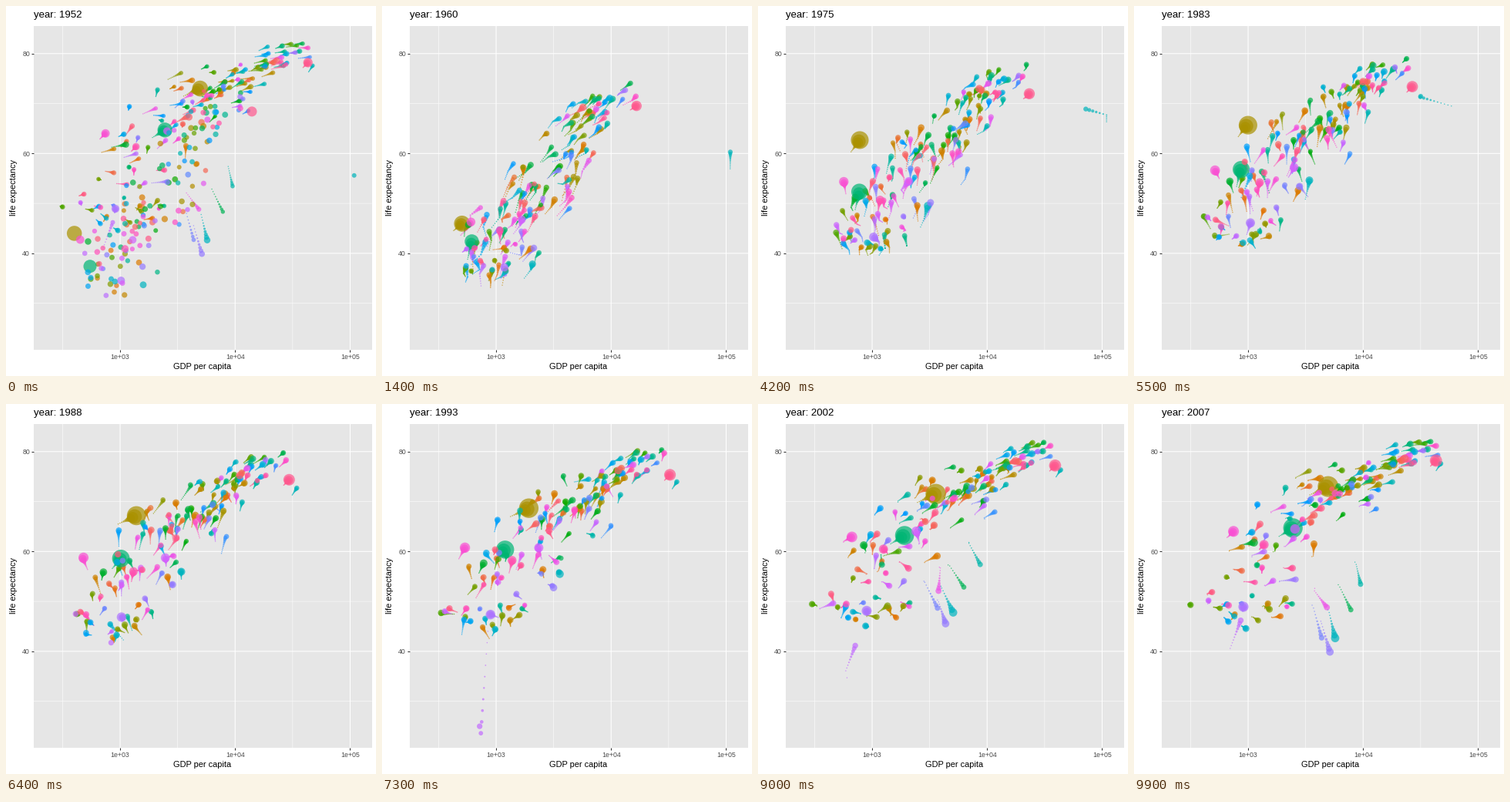
Write a matplotlib script that moves like this. It is 480 px wide and 480 px high and loops after 10 s.

```python
import numpy as np
import matplotlib.pyplot as plt
from matplotlib.animation import FuncAnimation

SIZE, DPI = 480, 80
PX = 72 / DPI                       # points per pixel
FRAMES, INTERVAL, WAKE = 100, 100, 10
COUNT = 142
YEARS = np.linspace(52, 107, FRAMES)   # years since 1900
NODES = np.arange(52, 108, 5)          # motion is straight between these
MAX_POP = 1319
PANEL = (36, 25.8, 474.5, 446.2)    # left, top, right, bottom
X_LIM, Y_LIM = (2.249, 5.188), (20.65, 85.55)

plt.rcParams["font.family"] = ["Liberation Sans", "DejaVu Sans"]
rng = np.random.default_rng(7)

# Bubbles that stand out: hue slot, first and last population in millions,
# then key points of (year, gdp, life)
STANDOUTS = [
    (24, 556, 1319, (52, 400, 44), (62, 540, 46.5), (69, 640, 60),
     (82, 962, 65.5), (107, 4959, 73)),
    (58, 372, 1110, (52, 547, 37.4), (82, 856, 56.6), (92, 1164, 60.2),
     (107, 2452, 64.7)),
    (134, 157, 301, (52, 13990, 68.4), (72, 21806, 71.3), (107, 42952, 78.2)),
    (71, 0.2, 2.5, (52, 108382, 55.6), (72, 109348, 67.7), (82, 31354, 71.3),
     (107, 47307, 77.6)),
    (107, 2.5, 8.9, (52, 493, 40), (87, 848, 44), (92, 737, 23.6),
     (97, 590, 36.1), (107, 863, 46.2)),
]

# The crowd: share, log gdp from-to, life from-to, temporary life gain
BANDS = [
    (24, 3.82, 4.47, 67.5, 80, 0),
    (24, 3.50, 4.05, 60, 75, 0),
    (32, 3.30, 3.75, 49, 72, 0),
    (22, 2.98, 3.30, 41, 64, 0),
    (29, 2.86, 2.95, 38, 51, 1),
    (6, 3.25, 3.80, 43, 47, 13),
]


def hue_color(slot):
    """Evenly spaced hue at lightness 65 and chroma 100 in polar CIE-LUV."""
    light, chroma = 65, 100
    h = np.radians(15 + 360 * slot / COUNT)
    y = ((light + 16) / 116) ** 3
    u = chroma * np.cos(h) / (13 * light) + 0.19784
    v = chroma * np.sin(h) / (13 * light) + 0.46834
    x = 9 * y * u / (4 * v)
    z = -x / 3 - 5 * y + 3 * y / v
    lin = np.array([[3.2405, -1.5371, -0.4985],
                    [-0.9693, 1.8760, 0.0416],
                    [0.0556, -0.2040, 1.0572]]) @ (x, y, z)
    lin = np.clip(lin, 0, 1)
    rgb = np.where(lin > 0.00304, 1.055 * lin ** (1 / 2.4) - 0.055, 12.92 * lin)
    return rgb ** 1.2               # slightly deeper display gamma


def crowd_member(x0, x1, y0, y1, gain):
    """Follow the band with a personal offset and a five-year random walk."""
    s = np.linspace(0, 1, len(NODES))
    x = x0 + (x1 - x0) * s + 0.05 * np.sin(2 * np.pi * s)
    y = y0 + (y1 - y0) * (1 - (1 - s) ** 1.4) + gain * np.sin(np.pi * s ** 1.5)
    a, b = np.clip(rng.normal(size=2), -2.1, 2.1)
    walk = 0.2 * rng.normal(size=(2, len(NODES))).cumsum(axis=1)
    # richer and longer-lived bubbles spread less
    x = x + (0.42 - 0.07 * x) * (0.9 * a + walk[0])
    y = y + (9.2 - 0.1 * y) * (0.3 * a + 0.8 * b + walk[1])
    pop = min(np.exp(rng.normal(1.5, 1.2)), 75)
    growth = 1 + 0.045 * (80 - y0)
    return (np.interp(YEARS, NODES, np.clip(x, 2.45, 4.67)),
            np.interp(YEARS, NODES, np.clip(y, 29, 82)),
            np.linspace(pop, pop * growth, FRAMES))


def standout(pop0, pop1, *stops):
    t, gdp, life = np.array(stops).T
    return (np.interp(YEARS, t, np.log10(gdp)), np.interp(YEARS, t, life),
            np.linspace(pop0, pop1, FRAMES))


tracks = {slot: standout(*spec) for slot, *spec in STANDOUTS}
free = rng.permutation([s for s in range(COUNT) if s not in tracks])
crowd = [band for share, *band in BANDS for _ in range(share)]
tracks.update((int(s), crowd_member(*band)) for s, band in zip(free, crowd))

data = np.array([tracks[s] for s in range(COUNT)])      # bubble, field, frame
xs, ys, pops = data.transpose(1, 2, 0)
sizes = 2 + 10 * np.sqrt(np.clip(pops / MAX_POP, 0, 1))
colors = np.array([hue_color(s) for s in range(COUNT)])


def marker_area(size):
    radius = 0.375 * (2.845 * size + 0.94) + 0.35       # pixels
    return (2 * radius * PX) ** 2


fig = plt.figure(figsize=(SIZE / DPI, SIZE / DPI), dpi=DPI, facecolor="white")
left, top, right, bottom = PANEL
ax = fig.add_axes([left / SIZE, 1 - bottom / SIZE,
                   (right - left) / SIZE, (bottom - top) / SIZE])
ax.set(xlim=X_LIM, ylim=Y_LIM, facecolor="#e6e6e6")
ax.spines[:].set_visible(False)
ax.set_xticks([3, 4, 5], ["1e+03", "1e+04", "1e+05"])
ax.set_yticks([40, 60, 80])
ax.tick_params(length=2.75 * PX, width=1.07 * PX, pad=2.2 * PX, color="#333333",
               labelcolor="#4d4d4d", labelsize=8.8 * PX)

for draw, major, minor in ((ax.axvline, (3, 4, 5), (2.5, 3.5, 4.5)),
                           (ax.axhline, (40, 60, 80), (30, 50, 70))):
    for values, width in ((minor, 0.53), (major, 1.07)):
        for value in values:
            draw(value, color="white", lw=width * PX, zorder=0.5, snap=False)


def label(x, y, text, size, **kw):
    return fig.text(x / SIZE, 1 - y / SIZE, text, fontsize=size * PX,
                    color="black", va="baseline", **kw)


title = label(35.5, 15, "", 13.2, ha="left")
label(255, 471, "GDP per capita", 11, ha="center")
label(13.5, 236, "life expectancy", 11, ha="center", rotation=90,
      rotation_mode="anchor")

# Oldest wake first, current bubbles on top
ages = np.arange(WAKE, -1, -1)
shrink = (1 - ages / (WAKE + 1)) ** 3
bubbles = ax.scatter(np.zeros(COUNT * len(ages)), np.zeros(COUNT * len(ages)),
                     c=np.tile(colors, (len(ages), 1)), alpha=0.7,
                     linewidths=0, zorder=2)


def update(frame):
    past = (frame - ages) % FRAMES
    bubbles.set_offsets(np.column_stack([xs[past].ravel(), ys[past].ravel()]))
    bubbles.set_sizes(marker_area(sizes[past] * shrink[:, None]).ravel())
    title.set_text(f"year: {1900 + YEARS[frame]:.0f}")
    return bubbles, title


anim = FuncAnimation(fig, update, frames=FRAMES, interval=INTERVAL,
                     init_func=lambda: update(0), repeat=True, repeat_delay=0)
plt.show()
```
